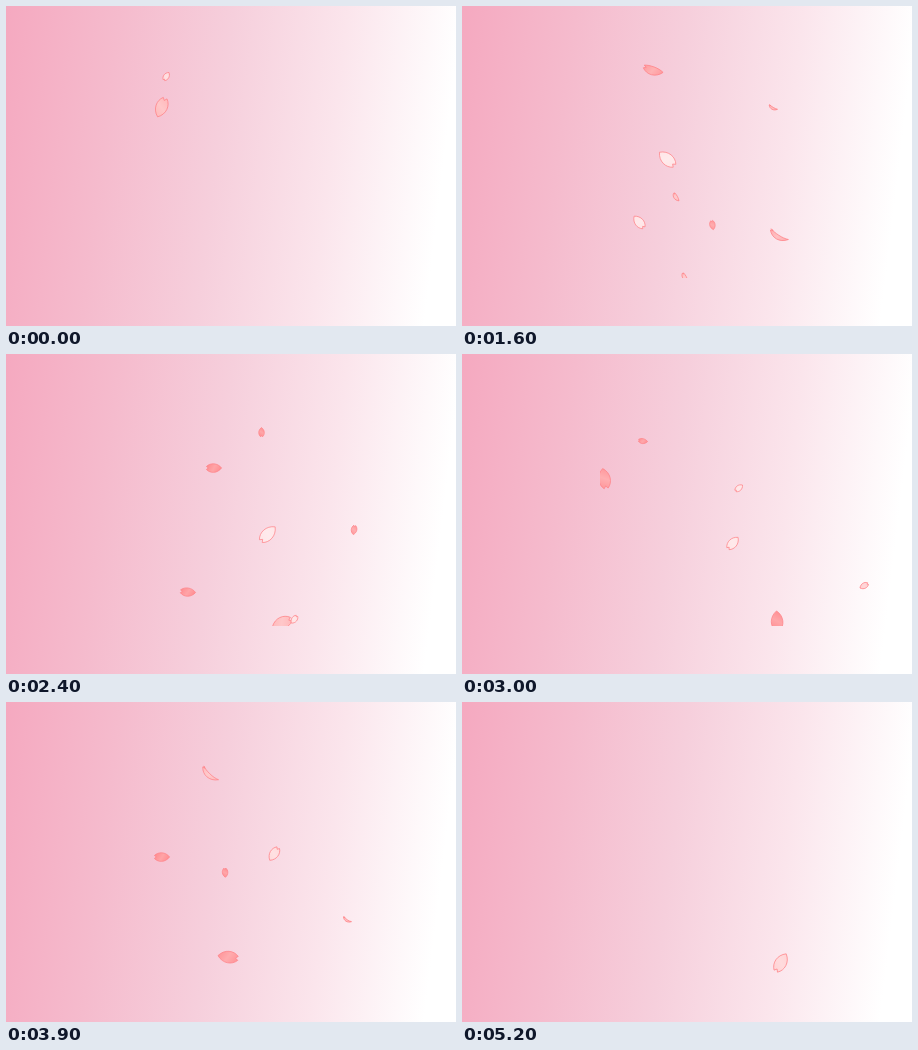
An HTML page with a canvas that plays this animation: 450x320 px, repeating every 5.3 s.

```html
<!DOCTYPE html>
<html>
<head>
<meta charset="utf-8">
<title>Falling petals</title>
<style>
html, body { margin: 0; width: 100%; height: 100%; overflow: hidden; }
canvas { display: block; }
</style>
</head>
<body>
<canvas id="stage" width="450" height="320"></canvas>
<script>
const ctx = document.getElementById('stage').getContext('2d');
const LOOP = 5300, STEP = 100, RAD = Math.PI / 180;
const petals = [];

// Each kind falls at its own steady speed and spin (per second); x follows from y.
const slope = k => y => y * k;
const gust = y => .38 * y + 6.2 * Math.log(1 + Math.exp((y - 165) / 10));
const LARGE = { length: 21, fall: 145, spin: -80, drift: slope(.61) };
const MEDIUM = { length: 16, fall: 125, spin: -80, drift: slope(.84) };
const SMALL = { length: 10, fall: 93, spin: 85, drift: gust };

// One known moment per petal: seconds, x, y, heading of the tip in degrees.
function scatter(kind, ...moments) {
  for (const [t, x, y, heading] of moments) petals.push({ kind, t, x, y, heading });
}

scatter(LARGE,
  [.9, 235, 232, 40], [.9, 255, 128, 90], [1.6, 205, 153, 222],
  [2.4, 262, 180, -45], [3.9, 222, 255, -172], [3.9, 204, 72, 45]);
scatter(MEDIUM,
  [.9, 213, 215, 230], [1.6, 177, 216, 230], [2.4, 208, 114, 0],
  [2.4, 182, 238, 5], [3.9, 268, 152, 124], [3.9, 156, 155, 0]);
scatter(SMALL,
  [.4, 152, 258, 40], [.9, 194, 154, 20], [.9, 173, 126, 0], [.9, 158, 206, 0],
  [.9, 171, 252, 75], [2.4, 348, 176, 100], [3, 277, 134, -40], [3, 181, 87, 10]);

function poseAt({ kind, t, x, y, heading }, now) {
  const age = now - t;
  const fallen = y + kind.fall * age;
  return {
    x: x + kind.drift(fallen) - kind.drift(y),
    y: fallen,
    angle: (heading + kind.spin * age) * RAD
  };
}

function fillColor(tone) {
  const g = Math.round(250 - 115 * tone), b = Math.round(251 - 112 * tone);
  return `rgb(255,${g},${b})`;
}

// Petals catch the light between quarter turns and curl up when facing down and right.
function drawPetal(length, { x, y, angle }) {
  const curl = Math.max(0, Math.sin(angle + 50 * RAD)) ** 12;
  const tone = Math.min(1, .58 + .4 * Math.cos(4 * angle) + .4 * curl);
  const r = length / 2 - .4;
  const half = length * (.27 - .18 * curl);
  const bend = length * .2 * curl;
  const top = bend - half, bottom = bend + half;

  ctx.save();
  ctx.translate(x, y);
  ctx.rotate(angle);
  ctx.translate(0, -bend / 2);
  ctx.beginPath();
  ctx.moveTo(r, 0);
  ctx.bezierCurveTo(r * .45, top * 1.3, -r * .5, top * 1.3, -r, top * .35);
  ctx.lineTo(-r * .75, bend * .35);
  ctx.lineTo(-r, bottom * .35);
  ctx.bezierCurveTo(-r * .5, bottom * 1.3, r * .45, bottom * 1.3, r, 0);
  ctx.closePath();
  const shade = ctx.createLinearGradient(-r, -half, r, half);
  shade.addColorStop(0, fillColor(tone));
  shade.addColorStop(.5, fillColor(tone * .75));
  shade.addColorStop(1, fillColor(tone));
  ctx.fillStyle = shade;
  ctx.fill();
  ctx.lineWidth = .7;
  ctx.strokeStyle = '#ff8287';
  ctx.stroke();
  ctx.restore();
}

const sky = ctx.createLinearGradient(0, 0, 450, 54);
['#f5a9c0', '#f5bbcd', '#f6cfdc', '#fbe5ec', '#ffffff']
  .forEach((color, i, all) => sky.addColorStop(i / (all.length - 1), color));

function frame(now) {
  const t = Math.floor(now % LOOP / STEP) * STEP / 1000;
  ctx.fillStyle = sky;
  ctx.fillRect(0, 0, 450, 320);
  ctx.save();
  ctx.beginPath();
  ctx.rect(138, 48, 312, 224);
  ctx.clip();
  for (const petal of petals) drawPetal(petal.kind.length, poseAt(petal, t));
  ctx.restore();
}

const start = performance.now();
function run() {
  frame(performance.now() - start);
  requestAnimationFrame(run);
}
run();
</script>
</body>
</html>
```
